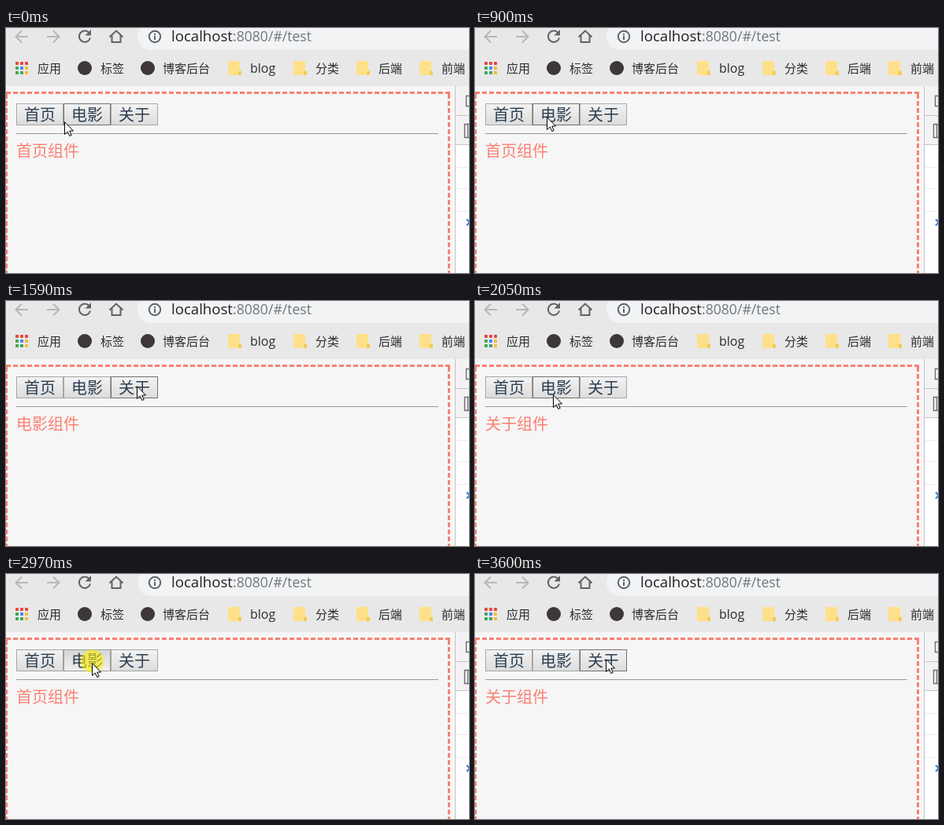
Write an HTML page that moves like this. It is 588 px wide and 312 px high and loops after 3830 ms.

```html
<!DOCTYPE html>
<html lang="zh-CN">
<head>
<meta charset="utf-8">
<title>localhost</title>
<style>
  html, body { margin: 0; width: 100%; height: 100%; overflow: hidden; background: #f6f6f6; }
  svg { display: block; width: 588px; height: 312px; }
  text { font-family: "Open Sans", "Noto Sans CJK SC", "Noto Sans CJK", sans-serif; white-space: pre; }
  .cjk { font-family: "Noto Sans CJK SC", "Noto Sans CJK", sans-serif; font-weight: 300; font-size: 20px; }
  .mark { font-size: 15px; fill: #2b2d30; }
  .icon { fill: none; stroke: #5f6368; stroke-width: 2; }
  .dash { fill: none; stroke: #fa8072; stroke-width: 3; stroke-dasharray: 6 3; }
</style>
</head>
<body>
<svg id="stage" viewBox="0 0 588 312">
  <defs>
    <linearGradient id="idle" x2="0" y2="1">
      <stop offset="0" stop-color="#f3f3f3"/><stop offset="1" stop-color="#dcdcdc"/>
    </linearGradient>
    <linearGradient id="pressed" x2="0" y2="1">
      <stop offset="0" stop-color="#d6d6d6"/><stop offset="1" stop-color="#f0f0f0"/>
    </linearGradient>
  </defs>

  <!-- browser toolbar -->
  <rect width="588" height="74" fill="#e8e8e8"/>
  <rect x="167" y="-6" width="460" height="34" rx="17" fill="#f1f3f4"/>
  <g class="icon">
    <path stroke="#b4b7ba" d="M28 11H13M20 3.5L12.5 11L20 18.5M52 11H67M60 3.5L67.5 11L60 18.5"/>
    <path d="M105.5 6A7.2 7.2 0 1 0 107 12.5"/>
    <path d="M108 2V9.5H100.5Z" fill="#5f6368" stroke="none"/>
    <path d="M131.500 11.500L140 3.500L148.500 11.500M134.500 9.500V18H145.500V9.500"/>
    <circle cx="189" cy="11" r="7.200"/>
    <path d="M189 10V15M189 7V9"/>
  </g>
  <text x="210" y="17" font-size="18.600" fill="#202124">localhost</text>
  <text x="288" y="17" font-size="17.600" fill="#73777b">:8080/#/test</text>
  <g id="bookmarks"></g>

  <!-- page -->
  <path class="dash" d="M0 82.500H564"/>
  <path class="dash" d="M.5 84V312M562.500 84V312"/>
  <path d="M13 134.500H549" stroke="#999"/>
  <g id="buttons"></g>
  <text id="view" class="cjk" x="13" y="163.500" fill="#fa8072"></text>

  <!-- developer panel -->
  <rect x="570" y="74" width="18" height="238" fill="#fff"/>
  <rect x="570" y="74" width="18" height="75" fill="#f3f3f3"/>
  <path d="M570.500 74V312M571 111.500H588M571 148.500H588" stroke="#c4c4c4"/>
  <path d="M571 177.500H588M571 204.500H588M571 233.500H588" stroke="#ececec"/>
  <path d="M590 86.500H584.500V99.500H590M590 122.500H582.500V139.500H590M586.500 122V140" fill="none" stroke="#6e6e6e" stroke-width="1.400"/>
  <path d="M585 243.500L589 247.500L585 251.500" fill="none" stroke="#3b78d8" stroke-width="2"/>

  <g id="pointer">
    <circle id="halo" cx=".5" cy="-2" r="14.800" fill="#fff200" opacity=".58"/>
    <path d="M.5 .7V16.500L4.200 13L6.800 18.500L9.200 17.500L6.700 12H11.500Z" fill="#fff" stroke="#000"/>
  </g>
</svg>
<script>
const LOOP = 3830;
const LABELS = ["首页", "电影", "关于"];
const LEFT = 13, WIDTH = 60;
const byId = id => document.getElementById(id);

function add(parent, tag, attrs, content = "") {
  const node = document.createElementNS("http://www.w3.org/2000/svg", tag);
  for (const key in attrs) node.setAttribute(key, attrs[key]);
  node.textContent = content;
  parent.append(node);
  return node;
}

function drawBookmarks(group) {
  const [red, green, blue, yellow] = ["#e8453c", "#3aa757", "#4285f4", "#f9bb2d"];
  [red, red, red, green, blue, yellow, green, green, yellow].forEach((fill, i) =>
    add(group, "rect", { x: 12 + i % 3 * 6, y: 43 + Math.floor(i / 3) * 6, width: 4, height: 4, rx: 1, fill }));
  for (const cx of [100, 180]) add(group, "circle", { cx, cy: 51, r: 9, fill: "#3d363a" });
  for (const x of [282, 365, 445, 525]) {
    add(group, "path", { d: `M${x + 1} 42h13q1 0 1 1v11h2v6h-16q-1 0-1-1v-16q0-1 1-1z`, fill: "#ffe08a" });
    add(group, "path", { d: `M${x + 13} 60v-5h4v5z`, fill: "#f4cb58" });
  }
  const labels = [[40, "应用"], [120, "标签"], [199, "博客后台"], [393, "分类"], [473, "后端"], [553, "前端"]];
  for (const [x, label] of labels) add(group, "text", { x, y: 57, class: "mark cjk", style: "font-size:15px" }, label);
  add(group, "text", { x: 310, y: 57, class: "mark", style: "font-size:16px" }, "blog");
}

const buttons = LABELS.map((label, i) => {
  const x = LEFT + i * WIDTH;
  const box = add(byId("buttons"), "rect", { x: x + .5, y: 96.5, width: WIDTH - 1, height: 27 });
  add(byId("buttons"), "text", { x: x + 10, y: 117.5, class: "cjk", fill: "#2c3e50" }, label);
  return box;
});

// Pointer samples: time, x, y
const PATH = [
  [0, 74, 119], [70, 76, 117], [130, 78, 116], [360, 78, 113],
  [590, 80, 112], [670, 83, 111], [740, 87, 111], [820, 90, 112], [900, 91, 113],
  [1360, 97, 112], [1440, 122, 110], [1510, 152, 108], [1590, 166, 108], [1670, 167, 109], [1740, 167, 110],
  [1980, 142, 114], [2050, 99, 119], [2130, 66, 117], [2210, 47, 112], [2290, 41, 110],
  [2590, 41, 108], [2670, 62, 109], [2740, 94, 112], [2820, 109, 113],
  [3220, 126, 112], [3290, 152, 109], [3370, 166, 107], [3600, 166, 108]
];
// Clicks: press time, release time, view opened on release
const CLICKS = [[1050, 1200, 1], [1820, 1900, 2], [2360, 2510, 0], [2970, 3140, 1], [3520, 3600, 2]];

function render(t) {
  const [, x, y] = PATH.findLast(([start]) => start <= t);
  const pressing = CLICKS.some(([down, up]) => t >= down && t < up);
  const opened = CLICKS.findLast(([, up]) => up <= t);
  const hovered = Math.floor((x - LEFT) / WIDTH);

  buttons.forEach((box, i) => {
    const over = i === hovered;
    box.setAttribute("fill", over && pressing ? "url(#pressed)" : "url(#idle)");
    box.setAttribute("stroke", over ? (pressing ? "#9c9c9c" : "#707070") : "#a6a6a6");
  });
  byId("view").textContent = LABELS[opened ? opened[2] : 0] + "组件";
  byId("halo").setAttribute("visibility", pressing ? "visible" : "hidden");
  byId("pointer").setAttribute("transform", `translate(${x} ${y})`);
}

drawBookmarks(byId("bookmarks"));
const begin = performance.now();
function tick() {
  render((performance.now() - begin) % LOOP);
  requestAnimationFrame(tick);
}
tick();
</script>
</body>
</html>
```
